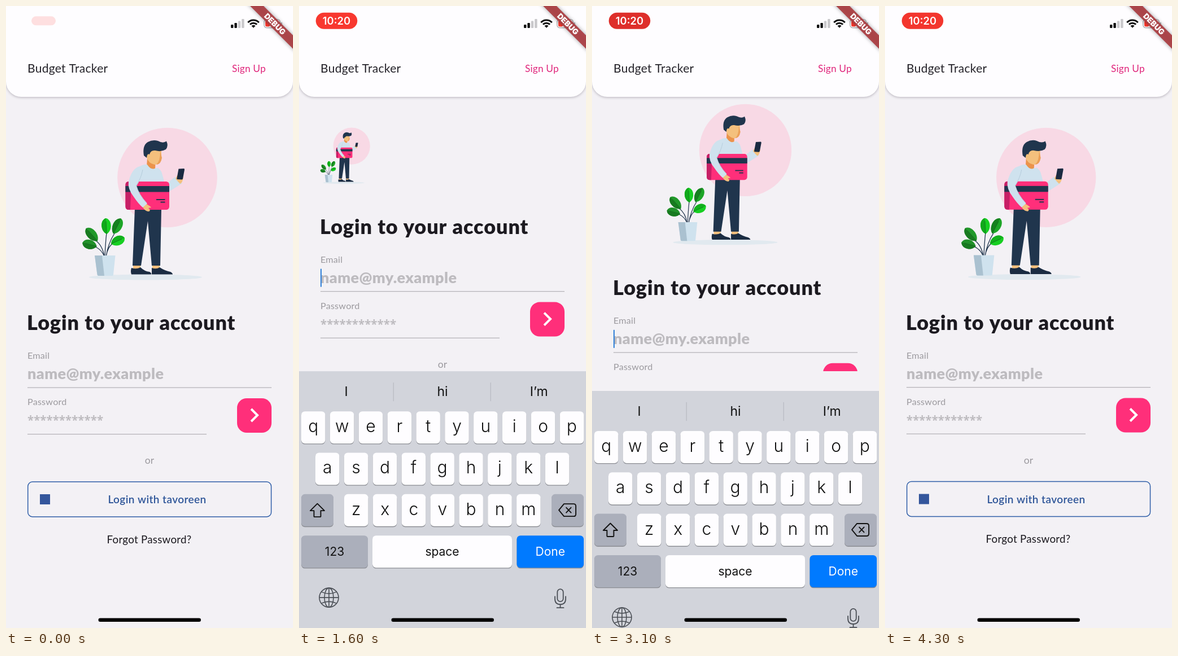
An HTML page with a canvas for the animation above (4400 ms loop, 508 by 1102 pixels).

```html
<!DOCTYPE html>
<html lang="en">
<head>
<meta charset="utf-8">
<title>Budget login</title>
<style>
html, body { margin: 0; width: 100%; height: 100%; overflow: hidden; background: #f3f1f5; }
canvas { display: block; width: 100%; height: 100%; }
</style>
</head>
<body>
<canvas id="stage" width="508" height="1102"></canvas>
<script>
const W = 508, H = 1102, LOOP = 4400;
const ctx = document.getElementById('stage').getContext('2d');
const LATO = 'Lato, "Open Sans", sans-serif';
const OPEN = '"Open Sans", Lato, sans-serif';
const INTER = 'Inter, Roboto, sans-serif';
const BG = '#f3f1f5', PINK = '#ff2f7a', NAVY = '#20354d', SKIN = '#f4c07d', SHIRT = '#cfe2ee';

// Each visit to the form: keyboard up, picture shrinks, keyboard down, picture grows
const VISITS = [
  { up: 1022, shrink: 1121, down: 1900, grow: 1964 },
  { up: 2870, shrink: 2984, down: 3775, grow: 3839 }
];
const RESIZE = 480, KEYS_H = 455, VIEW_END = 647;

const clamp = v => Math.max(0, Math.min(1, v));
const ease = v => { v = clamp(v); return v < .5 ? 2 * v * v : 1 - 2 * (1 - v) * (1 - v); };
const spring = ms => {
  const a = Math.max(0, ms) * .01826;
  return 1 - (1 + a) * Math.exp(-a);
};

function poseAt(t) {
  const v = t < 2600 ? VISITS[0] : VISITS[1];
  const keys = t < v.down ? spring(t - v.up) : 1 - spring(t - v.down);
  const small = t < v.grow ? ease((t - v.shrink) / RESIZE) : 1 - ease((t - v.grow) / RESIZE);
  const opening = t < v.grow;
  const blink = t - v.up - 90;
  return {
    keys: keys < .002 ? 0 : keys,
    small,
    scroll: opening ? 47.6 * (1 - small) * ease((t - v.up - 50) / 100) : 0,
    clip: t > v.up + 50 && t < v.down + 30,
    caret: blink >= 0 && blink % 1000 < 500 && t < v.down,
    pressed: t > v.down - 85 && t < v.down + 50
  };
}

function text(str, x, y, size, color, opt = {}) {
  ctx.font = `${opt.weight || 400} ${size}px ${opt.font || LATO}`;
  ctx.letterSpacing = (opt.gap || 0) + 'px';
  ctx.textAlign = opt.align || 'left';
  ctx.fillStyle = color;
  ctx.fillText(str, x, y);
}

function box(x, y, w, h, r, fill) {
  ctx.beginPath();
  ctx.roundRect(x, y, w, h, r);
  if (fill) { ctx.fillStyle = fill; ctx.fill(); }
}

function shape(d, fill) {
  ctx.fillStyle = fill;
  ctx.fill(new Path2D(d));
}

function line(d, color, width, cap = 'butt') {
  ctx.strokeStyle = color;
  ctx.lineWidth = width;
  ctx.lineCap = cap;
  ctx.stroke(new Path2D(d));
}

function oval(x, y, rx, ry, fill) {
  ctx.beginPath();
  ctx.ellipse(x, y, rx, ry, 0, 0, Math.PI * 2);
  ctx.fillStyle = fill;
  ctx.fill();
}

function leaf(x, y, deg, len, light, dark) {
  ctx.save();
  ctx.translate(x, y);
  ctx.rotate(deg * Math.PI / 180);
  const d = `M0 ${len} C-11 ${len * .6} -11 ${-len * .8} 0 ${-len} C11 ${-len * .8} 11 ${len * .6} 0 ${len}Z`;
  shape(d, light);
  shape(`M0 ${len} C-11 ${len * .6} -11 ${-len * .8} 0 ${-len}Z`, dark);
  line(`M0 ${len} L0 ${-len * .6}`, '#12661c', .7);
  ctx.restore();
}

function plant() {
  line('M175 444 Q176 420 178 402 M174 444 Q171 424 158 415 M174 444 Q170 432 157 426 M177 444 Q181 420 192 403 M177 444 Q180 426 190 420', NAVY, 1.3);
  leaf(177.5, 390, -3, 14, '#17cf22', '#10a91b');
  leaf(152, 405, -42, 15, '#21982a', '#187a20');
  leaf(197, 390, 27, 15, '#1da527', '#16801f');
  leaf(148, 422.5, -75, 13, '#21912a', '#187a20');
  leaf(198, 416, 66, 13, '#17cf22', '#12b01d');
  shape('M157 442 H193.500 L190 476 Q190 478 188 478 H164 Q162 478 161.500 476Z', SHIRT);
  shape('M157 442 H170 L174 478 H164 Q162 478 161.500 476Z', '#aac1d0');
}

function person() {
  // legs and shoes
  shape('M225 457 H238 V466 H225Z M259 457 H272 V466 H259Z', SKIN);
  shape('M228 359 H275 L273 460 H258 L251 381 L239 460 H224Z', NAVY);
  shape('M222 464 Q231 467 238 463 Q245 470 254 471 Q258 473 257 475.500 H222 Q220 470 222 464Z M258 464 Q266 467 272 463 Q281 469 291 471 Q295 473 295 475.500 H258Z', '#1b2c42');
  // far arm and phone
  shape('M268 286 Q277 292 281 317 L299 303 L312 314 L290 328 L272 326Z', SHIRT);
  shape('M300 306 L303 300 L313 300 Q315 307 310 314 L308 315Z', SKIN);
  shape('M305.500 288.500 L315 288 Q316 288 316 290 L313 306 Q312.500 307.500 311 307.500 L303 307 Q302 307 302.500 305Z', '#1a2a41');
  // neck, torso, head
  shape('M250 270 H265 L264 288 Q257 293 249 285Z', '#eb934b');
  shape('M237 284 Q244 280 250 281 Q257 292 265 287 Q276 288 277 302 V315 H228Z', SHIRT);
  shape('M249 257 Q262 248 275 256 V270 Q274 282 263 281 Q252 279 249 268Z', SKIN);
  shape('M273 257 L276 269 Q274 281 266 281 Q273 275 273 257Z', '#eba059');
  shape('M244 265 Q241 247 251 241 Q260 236 269 239 Q278 244 284 239.500 Q288 248 283 254 Q275 259 264 256 Q256 255 254 263 Q250 260 249 269Z', NAVY);
  // card
  box(211.5, 311, 77.5, 50, 5.5, PINK);
  shape('M217 311 H222 L220 361 H217 Q211.500 361 211.500 355 V317 Q211.500 311 217 311Z', '#c71f66');
  ctx.fillStyle = NAVY;
  ctx.fillRect(211.5, 319, 77.5, 10.5);
  ctx.fillRect(266, 342, 15.5, 2);
  ctx.fillRect(273.5, 346.5, 8, 2);
  // near arm
  shape('M240 351 L249 351 Q256 355 257 357 L252 358 Q257 362 253 364 Q247 364 243 358Z', SKIN);
  shape('M237 284 Q223 287 217 311 Q215 324 226 338 Q234 350 242 357 L250 350 Q236 336 231 319 Q240 304 243 290Z', SHIRT);
  line('M242 290 Q239 306 230.500 318 Q235 334 249 349', '#b5ccdb', 1);
}

function picture(small, scroll) {
  const u = .631 * small, s = 1 - u;
  ctx.save();
  ctx.translate(241.5 - 127 * u - 212 * u * u, 215.5 - scroll);
  ctx.scale(s, s);
  ctx.translate(-241.5, -215.5);
  oval(285.5, 304, 88.3, 88.3, '#f8d9e5');
  oval(247, 480.5, 100, 5, '#e1e9ef');
  plant();
  person();
  ctx.restore();
}

function form(p) {
  ctx.save();
  if (p.clip) {
    ctx.beginPath();
    ctx.rect(0, 0, W, VIEW_END);
    ctx.clip();
  }
  picture(p.small, p.scroll);
  ctx.translate(0, -p.scroll - 170.4 * p.small);
  text('Login to your account', 37, 574, 36, '#1c1a20', { weight: 900, gap: .9 });
  text('Email', 38, 625, 16.2, '#9c9a9f', { gap: .2 });
  text('name@my.example', 38, 661, 27, '#bdbbbf', { weight: 900, gap: .4 });
  ctx.fillStyle = '#b2b0b5';
  ctx.fillRect(38, 675.5, 432, 1.2);
  ctx.fillRect(38, 758, 317, 1.2);
  if (p.caret) {
    ctx.fillStyle = '#2f7fd8';
    ctx.fillRect(38, 636, 2, 32);
  }
  text('Password', 38, 707, 16.2, '#9c9a9f', { gap: .2 });
  text('*'.repeat(12), 38, 741, 20.5, '#bdbbbf', { font: OPEN, weight: 700 });
  box(409, 695, 61, 61, 17, PINK);
  line('M434 714 L445 725 L434 736', '#fff', 4);
  text('or', 254, 811, 17.5, '#9c9a9f', { align: 'center' });
  box(38.7, 843.1, 430.8, 61.8, 8);
  ctx.strokeStyle = '#2f5ea8';
  ctx.lineWidth = 1.5;
  ctx.stroke();
  ctx.fillStyle = '#34569c';
  ctx.fillRect(60, 865, 18, 18);
  text('Login with tavoreen', 267.5, 881, 19, '#2f5699', { weight: 600, align: 'center', gap: .4 });
  text('Forgot Password?', 253.5, 951.5, 18.8, '#1c1a20', { align: 'center', gap: .25 });
  ctx.restore();
}

function header() {
  ctx.save();
  ctx.shadowColor = 'rgba(40,30,50,.28)';
  ctx.shadowBlur = 4;
  ctx.shadowOffsetY = 1.2;
  box(0, -30, W, 191, [0, 0, 27, 27], '#fefdff');
  ctx.restore();
  text('Budget Tracker', 38, 118, 21, '#25232a', { gap: .3 });
  text('Sign Up', 400, 117, 17.2, '#e0267c', { gap: .2 });
}

function status(t) {
  // recording pill
  const k = ease(t / 400);
  const w = 43 + 30.5 * k, h = 16 + 13 * k;
  const glow = .5 - .5 * Math.cos((t - 900) / 1000 * Math.PI);
  ctx.save();
  ctx.globalAlpha = .15 + .85 * k;
  box(66.5 - w / 2, 26.3 - h / 2, w, h, h / 2, `rgb(${219 + 36 * glow},${46 + 13 * glow},${42 + 6 * glow})`);
  ctx.globalAlpha = k * k;
  text('10:20', 66.5, 33, 18.4, '#fff', { font: INTER, weight: 600, align: 'center' });
  ctx.restore();
  // signal
  [6, 9, 12.5, 16].forEach((b, i) => box(398 + i * 6.4, 39 - b, 4.4, b, 1.2, i < 2 ? '#111' : '#c9c8cb'));
  // wifi
  ctx.strokeStyle = '#111';
  ctx.lineWidth = 3;
  ctx.lineCap = 'butt';
  [8.3, 13.4].forEach(r => {
    ctx.beginPath();
    ctx.arc(438, 38.5, r, -Math.PI * .76, -Math.PI * .24);
    ctx.stroke();
  });
  ctx.beginPath();
  ctx.moveTo(438, 38.8);
  ctx.arc(438, 38.5, 4.8, -Math.PI * .76, -Math.PI * .24);
  ctx.fillStyle = '#111';
  ctx.fill();
  // battery
  box(456.8, 23.6, 28.5, 15, 4.8);
  ctx.strokeStyle = '#a9a8ab';
  ctx.lineWidth = 1.3;
  ctx.stroke();
  box(459, 25.8, 8, 10.6, 2.5, '#ff3b30');
  box(486.7, 28.7, 2, 5, 1, '#a9a8ab');
}

function ribbon() {
  ctx.save();
  ctx.translate(W, 0);
  ctx.rotate(Math.PI / 4);
  ctx.shadowColor = 'rgba(0,0,0,.4)';
  ctx.shadowBlur = 7;
  ctx.fillStyle = 'rgba(172,62,66,.93)';
  ctx.fillRect(-60, 36.8, 120, 16.8);
  ctx.shadowColor = 'transparent';
  text('DEBUG', 0, 50, 13.6, '#fff', { font: INTER, weight: 900, align: 'center' });
  ctx.restore();
}

function key(x, y, w, label, fill = '#fefdff', color = '#111', size = 30) {
  box(x, y + 1.4, w, 57, 6.5, '#8b8d93');
  box(x, y, w, 57, 6.5, fill);
  if (label) {
    const letter = size === 30;
    text(label, x + w / 2, y + (letter ? 37 : 36), size, color,
      { font: INTER, weight: letter ? 300 : 400, align: 'center' });
  }
}

function keyboard(p) {
  if (!p.keys) return;
  const GREY = '#abafbb', ICON = '#4b4f56';
  ctx.save();
  ctx.translate(0, KEYS_H * (1 - p.keys));
  ctx.fillStyle = '#d2d4db';
  ctx.fillRect(0, VIEW_END, W, KEYS_H);
  ['I', 'hi', 'I’m'].forEach((s, i) =>
    text(s, 83.5 + i * 170.6, 691, 23, '#111', { font: INTER, align: 'center' }));
  ctx.fillStyle = '#b7b9c1';
  ctx.fillRect(166.6, 667, 1.2, 33);
  ctx.fillRect(338.6, 667, 1.2, 33);

  [['qwertyuiop', 4], ['asdfghjkl', 29], ['zxcvbnm', 80]].forEach(([row, x], r) =>
    [...row].forEach((c, i) => key(x + i * 50.85, 718 + r * 73.3, 42.5, c)));
  key(4, 864.6, 57, '', GREY);
  key(447, 864.6, 57, '', GREY);
  key(4, 938, 118, '123', GREY, '#111', 21);
  key(130, 938, 247, 'space', undefined, '#111', 21);
  key(385.5, 938, 118.5, 'Done', p.pressed ? '#fefdff' : '#007aff', p.pressed ? '#111' : '#fff', 21);

  ctx.lineJoin = 'round';
  line('M32.500 881.500 L45 894 H38.500 V904 Q38.500 905 37.500 905 H27.500 Q26.500 905 26.500 904 V894 H20Z', '#111', 1.9);
  line('M469 882 H486 Q490 882 490 886 V900 Q490 904 486 904 H469 L460 893Z M472.500 888 L482 898 M482 888 L472.500 898', '#111', 1.9);

  line('M53 1031 V1065 M36 1048 H70 M40 1038 Q53 1044 66 1038 M40 1058 Q53 1052 66 1058', ICON, 1.6);
  [17, 8].forEach(rx => {
    ctx.beginPath();
    ctx.ellipse(53, 1048, rx, 17, 0, 0, Math.PI * 2);
    ctx.stroke();
  });
  box(457.3, 1033, 10.4, 22, 5.2);
  ctx.lineWidth = 1.8;
  ctx.stroke();
  line('M453 1046 V1050 Q453 1060 462.500 1060 Q472 1060 472 1050 V1046 M462.500 1060 V1066 M456.500 1066 H468.500', ICON, 1.8, 'round');
  ctx.lineJoin = 'miter';
  ctx.restore();
}

function draw(t) {
  const p = poseAt(t);
  ctx.fillStyle = BG;
  ctx.fillRect(0, 0, W, H);
  form(p);
  header();
  status(t);
  ribbon();
  keyboard(p);
  box(163.5, 1084.5, 181.5, 6.6, 3.3, '#050505');
}

const start = performance.now();
function tick() {
  draw((performance.now() - start) % LOOP);
  requestAnimationFrame(tick);
}
tick();
</script>
</body>
</html>
```
